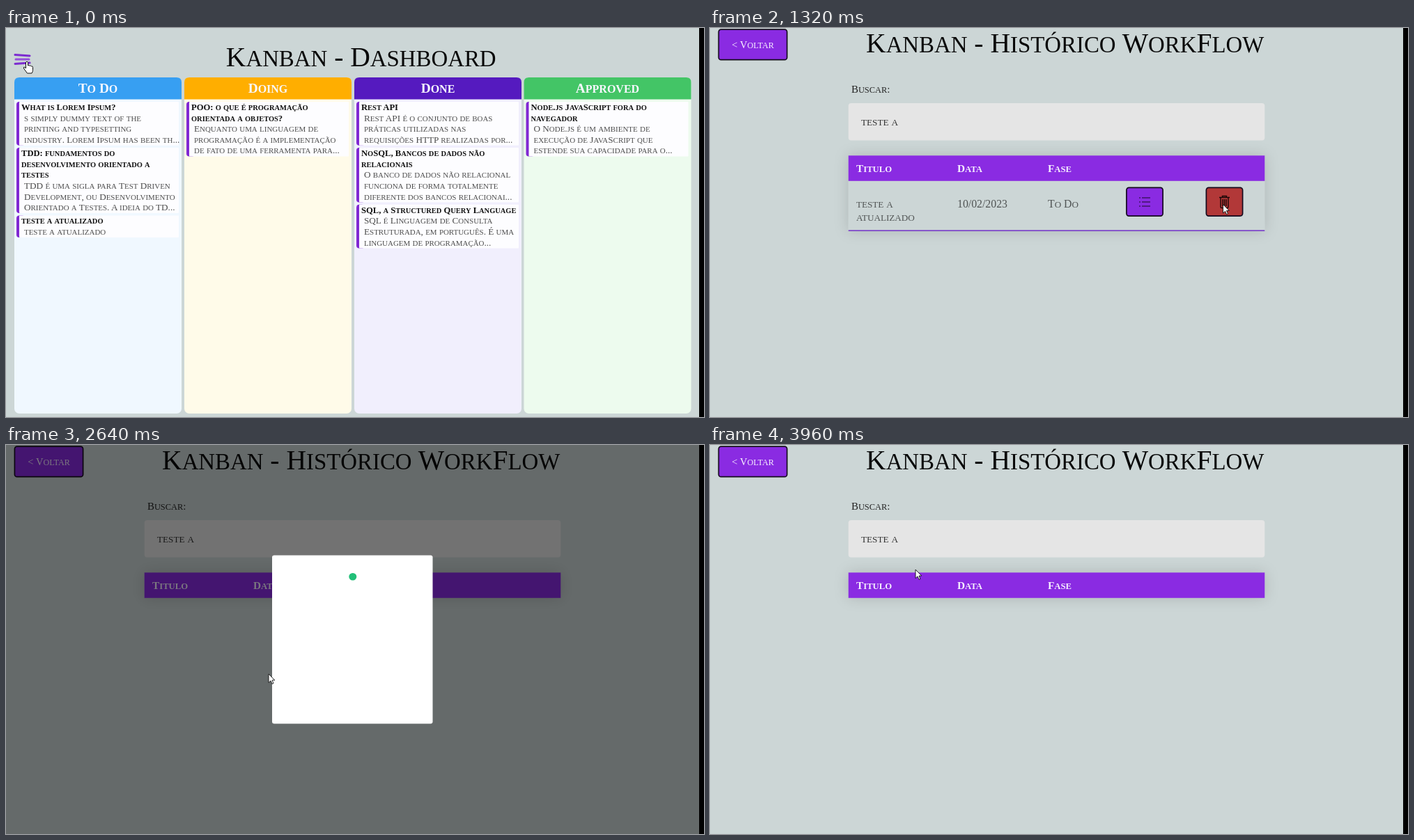
Recreate the animation shown at these times as an HTML page. Size 1002x559 px, loop 4290 ms.

```html
<!DOCTYPE html>
<html lang="pt-BR">
<head>
<meta charset="utf-8">
<title>Kanban</title>
<style>
  html, body { margin: 0; width: 100%; height: 100%; overflow: hidden; background: #ccd6d6; }
  svg { display: block; width: 100vw; height: 100vh; font-family: "Liberation Serif", "Noto Serif", serif; }
  .shadow { filter: drop-shadow(0 0 10px rgba(0, 0, 0, .15)); }
  .status { font: 600 8px "Open Sans", sans-serif; }
</style>
</head>
<body>
<svg id="stage" viewBox="0 0 1002 559"></svg>
<script>
const PAGE = '#ccd6d6', PURPLE = '#8a2be2', RED = '#c7403f', GREEN = '#21bf78';
const STEP = 330;

const rect = (x, y, w, h, fill, r = 0, extra = '') =>
  `<rect x="${x}" y="${y}" width="${w}" height="${h}" rx="${r}" fill="${fill}" ${extra}/>`;

// Lowercase letters are set as small capitals.
const caps = s => s.replace(/[a-z\u00e0-\u00ff]+|</g, m =>
  m === '<' ? '&lt;' : `<tspan font-size=".83em">${m.toUpperCase()}</tspan>`);

const text = (x, y, size, s, { fill = '#111', weight = 400, anchor = 'start' } = {}) =>
  `<text x="${x}" y="${y}" font-size="${size}" fill="${fill}" font-weight="${weight}" text-anchor="${anchor}">${caps(s)}</text>`;

const button = (x, y, w, h, fill) =>
  rect(x + .9, y + .9, w - 1.8, h - 1.8, fill, 3.5, 'stroke="#140a1e" stroke-width="1.7"');

const title = (y, s) => text(509.7, y, 39.6, s, { fill: '#080808', anchor: 'middle' });

// Board: each card is [bold lines, plain lines].
const columns = [
  { x: 12, name: 'To Do', head: '#379ff2', body: '#f0f8ff', cards: [
    [['What is Lorem Ipsum?'],
     ['s simply dummy text of the', 'printing and typesetting', 'industry. Lorem Ipsum has been th...']],
    [['TDD: fundamentos do', 'desenvolvimento orientado a', 'testes'],
     ['TDD é uma sigla para Test Driven', 'Development, ou Desenvolvimento', 'Orientado a Testes. A ideia do TD...']],
    [['teste a atualizado'], ['teste a atualizado']]] },
  { x: 256, name: 'Doing', head: '#ffae00', body: '#fffbe9', cards: [
    [['POO: o que é programação', 'orientada a objetos?'],
     ['Enquanto uma linguagem de', 'programação é a implementação', 'de fato de uma ferramenta para...']]] },
  { x: 500, name: 'Done', head: '#551abf', body: '#f1effd', cards: [
    [['Rest API'],
     ['Rest API é o conjunto de boas', 'práticas utilizadas nas', 'requisições HTTP realizadas por...']],
    [['NoSQL, Bancos de dados não', 'relacionais'],
     ['O banco de dados não relacional', 'funciona de forma totalmente', 'diferente dos bancos relacionai...']],
    [['SQL, a Structured Query Language'],
     ['SQL é Linguagem de Consulta', 'Estruturada, em português. É uma', 'linguagem de programação...']]] },
  { x: 743.5, name: 'Approved', head: '#43c566', body: '#edfbee', cards: [
    [['Node.js JavaScript fora do', 'navegador'],
     ['O Node.js é um ambiente de', 'execução de JavaScript que', 'estende sua capacidade para o...']]] }
];

function card(x, y, [bold, plain]) {
  const h = (bold.length + plain.length) * 15.6 + .4;
  const base = i => y + 12 + i * 15.6;
  return rect(x + 3, y, 12, h, '#8128d2', 4) + rect(x + 7, y, 229, h, '#fdfdff', 1) +
    bold.map((s, i) => text(x + 10, base(i), 12.6, s, { weight: 700 })).join('') +
    plain.map((s, i) => text(x + 14, base(i + bold.length), 13.2, s, { fill: '#4c4c4c' })).join('');
}

function column({ x, name, head, body, cards }) {
  let y = 106, out = rect(x, 71, 240, 483, body, 7) +
    `<path d="M${x} 102.5V78q0-7 7-7h226q7 0 7 7v24.5z" fill="${head}"/>` +
    text(x + 120, 93, 19.3, name, { fill: '#f8f8ff', weight: 700, anchor: 'middle' });
  for (const c of cards) {
    out += card(x, y, c);
    y += (c[0].length + c[1].length) * 15.6 + 3.7;
  }
  return out;
}

const menuIcon = `<g stroke="#7c2bd0" stroke-width="3" stroke-linecap="round">
  <path d="M13 38.5 34 40M13 51.5 34 50"/><path d="M14 45H33" stroke="#9550dc"/></g>`;

const board = () => title(55, 'Kanban - Dashboard') + menuIcon + columns.map(column).join('');

// History page
const listIcon = (x, y) => `<path transform="translate(${x} ${y})" stroke="#160a24" stroke-width="1.2"
  d="M-4-6H8M-4 0H8M-4 6H8M-8-6h2M-8 0h2M-8 6h2"/>`;

const trashIcon = (x, y) => `<path transform="translate(${x} ${y})" fill="none" stroke="#1c0808" stroke-width="1.4"
  d="M-7.5-6.5h15M-3-6.5v-2h6v2M-5.5-6.5v13.5q0 1.5 1.5 1.5h8q1.5 0 1.5-1.5v-13.5M-2.5-4v10M0-4v10M2.5-4v10"/>`;

const wide = { date: 382, phase: 494, list: 617.5, trash: 713.5 };
const narrow = { date: 355, phase: 485, list: 597, trash: 711.5 };
const band = (y, h, fill, extra = '') => rect(198.7, y, 597.6, h, fill, 0, extra);

function row(y, h, fill, lines, date, phase, cols, trashFill = RED) {
  const cell = (x, s, i = 0) => text(x, y + 38 + i * 19, 15.8, s, { fill: '#505454' });
  return band(y, h, fill) + lines.map((s, i) => cell(210, s, i)).join('') +
    cell(cols.date, date) + cell(cols.phase, phase) +
    button(cols.list, y + 8.5, 54, 42.5, PURPLE) + listIcon(cols.list + 27, y + 30) +
    button(cols.trash, y + 8.5, 54, 42.5, trashFill) + trashIcon(cols.trash + 27, y + 30);
}

const tableHead = cols => band(183.3, 36.5, PURPLE) +
  [[210, 'Titulo'], [cols.date, 'Data'], [cols.phase, 'Fase']]
    .map(([x, s]) => text(x, 206.5, 15.3, s, { fill: '#f6f0ff', weight: 700 })).join('');

const shadow = h => band(183.3, h, PAGE, 'class="shadow"');

const tables = {
  full: () => shadow(348.7) +
    '<clipPath id="view"><path d="M198 183H796.3V532H198z"/></clipPath><g clip-path="url(#view)">' +
    tableHead(wide) +
    row(220, 71.5, PAGE, ['What is Lorem', 'Ipsum?'], '26/01/2023', 'To Do', wide) +
    row(291.5, 109.5, '#f2f2f2', ['TDD: fundamentos', 'do', 'desenvolvimento', 'orientado a testes'], '26/01/2023', 'To Do', wide) +
    row(401, 109, PAGE, ['POO: o que é', 'programação', 'orientada a', 'objetos?'], '26/01/2023', 'Doing', wide) +
    row(510, 71, '#f2f2f2', [], '', '', wide) +
    rect(789, 183, 7.3, 349, '#f1f1f1') + rect(789, 183, 7.3, 179, '#b079e2', 3.5) + '</g>',
  match: hover => shadow(108.5) + tableHead(narrow) +
    row(220, 71, PAGE, ['teste a', 'atualizado'], '10/02/2023', 'To Do', narrow, hover ? '#b23838' : RED) +
    band(290.4, 1.5, '#7230c8'),
  empty: () => shadow(36.5) + tableHead(narrow)
};

const history = ({ table, query, hover }) =>
  button(11.5, 1.3, 100, 45.3, PURPLE) +
  text(61.5, 28.5, 14.6, '< Voltar', { fill: '#f8f2ff', anchor: 'middle' }) +
  title(35, 'Kanban - Histórico WorkFlow') +
  text(203, 93, 14.9, 'Buscar:', { fill: '#222' }) +
  rect(198.7, 108, 597.6, 53.5, '#e5e5e5', 4) +
  text(217, 139.5, 15.9, query || 'Será pesquisado por Título', { fill: query ? '#333' : '#777' }) +
  tables[table](hover);

const statusBar = () => rect(-4, 544, 228, 20, '#202026', 3) +
  '<text x="4" y="555" class="status" fill="#eee">https://kanban-fulanobeltranopaz.vercel.app/historico</text>';

// Layers above the page
const shade = rect(0, 0, 995, 559, '#000', 0, 'opacity=".5"');

const confirmBox = ({ press }) => shade + rect(283, 198, 429, 163, '#f6feff', 3) +
  text(290, 226.5, 19, 'Atenção', { weight: 700 }) +
  '<path d="M695.5 219.5l5 5m0-5l-5 5" stroke="#333"/>' +
  rect(290, 240, 416, 1, '#dbe2e4') +
  text(290, 264, 19.5, 'Realmente deseja apagar o workFlow?') +
  text(293, 285, 12.8, 'teste a atualizado', { fill: '#222' }) +
  button(347, 304, 93, 45.5, press ? '#7b25cb' : PURPLE) +
  text(393.5, 331.5, 15.7, 'Apagar', { fill: '#f6f0ff', anchor: 'middle' }) +
  button(556, 304, 92, 45.5, RED) +
  text(602, 331.5, 15.8, 'Fechar', { fill: '#fff0f0', anchor: 'middle' });

const successBox = ({ ring, check }) => shade + rect(382, 158.5, 230.5, 242, '#fff', 3) +
  `<g fill="none" stroke="${GREEN}" stroke-width="10.5" stroke-linecap="round" stroke-linejoin="round">
  <circle cx="497.5" cy="279.5" r="90.3" pathLength="1" stroke-dasharray="${ring || .001} 2" transform="rotate(-90 497.5 279.5)"/>
  ${check ? '<path d="M460 277 486.5 303.5 532 258"/>' : ''}</g>`;

const pointers = {
  arrow: '<path d="M0 0V12.5L3 9.8 5 14.3 7 13.4 5 9H8.8z" fill="#fff" stroke="#111" stroke-width=".9"/>',
  hand: '<path d="M-1.5 1.3q1.5-2.3 3 0V6q1.6-1.3 2.6.4 1.6-.8 2.4.6 2-.5 2 1.6v4q0 2-1.5 4.4H.5L-4.5 10q-.6-2.3 1.4-1.7L-1.5 10z" fill="#fff" stroke="#111"/>'
};
const pointer = ([kind, x, y]) => `<g transform="translate(${x} ${y})">${pointers[kind]}</g>`;

// One entry per step; each carries over what it does not change.
const steps = [
  { page: board, at: ['hand', 30, 48] },
  { at: ['hand', 52, 122] },
  { page: history, table: 'full', status: true, at: ['arrow', 52, 122.5] },
  { table: 'match', query: 'teste a', status: false, at: null },
  { hover: true, at: ['arrow', 736.5, 253.5] },
  { box: confirmBox },
  { hover: false, at: ['arrow', 558, 291] },
  { press: true, at: ['hand', 379, 329] },
  { table: 'empty', box: successBox, ring: 0, at: ['arrow', 377, 329] },
  { ring: .5 },
  { ring: 1, check: true },
  { box: null },
  { at: ['arrow', 295, 179] }
].reduce((all, s) => [...all, { ...all.at(-1), ...s }], []);

const pictures = steps.map(s =>
  rect(0, 0, 1002, 559, PAGE) + s.page(s) + (s.box ? s.box(s) : '') +
  (s.status ? statusBar() : '') + (s.at ? pointer(s.at) : '') +
  rect(995, 0, 7, 559, '#000'));

const stage = document.getElementById('stage');
const start = performance.now();
let shown = -1;

function play() {
  const i = Math.floor((performance.now() - start) / STEP) % steps.length;
  if (i !== shown) stage.innerHTML = pictures[shown = i];
  requestAnimationFrame(play);
}
play();
</script>
</body>
</html>
```
